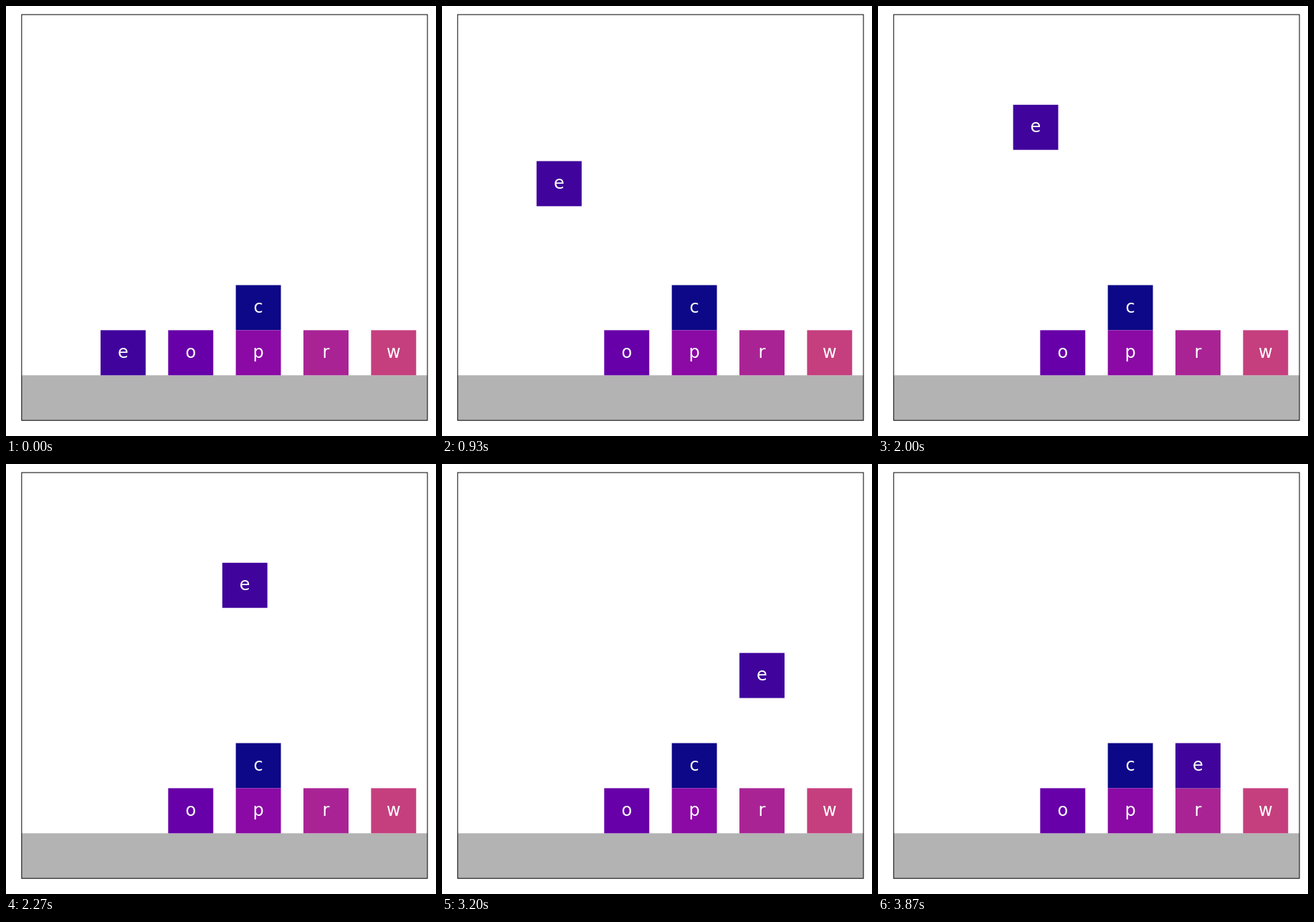
An HTML page for the animation above (3940 ms loop, 600x600 px).

```html
<!DOCTYPE html>
<html lang="en">
<head>
<meta charset="utf-8">
<title>Stacking blocks</title>
<style>
  html, body { margin: 0; width: 100%; height: 100%; overflow: hidden; background: #fff; }
  svg { display: block; width: 100vw; height: 100vh; }
  text { font: 24px "DejaVu Sans", sans-serif; fill: #fff; text-anchor: middle; }
</style>
</head>
<body>
<svg id="stage" viewBox="0 0 600 600"></svg>
<script>
const stage = document.getElementById("stage");
const LOOP = 3940, LAST = 58;
const UNIT = 62.91, LEFT = 21.85, TOP = 12, SIZE = 9 * UNIT;

function add(parent, tag, attrs, label) {
  const el = document.createElementNS("http://www.w3.org/2000/svg", tag);
  for (const name in attrs) el.setAttribute(name, attrs[name]);
  if (label) el.textContent = label;
  return parent.appendChild(el);
}

// Columns and levels are in block units; level 0 rests on the table.
function place(block, col, level) {
  const x = LEFT + col * UNIT;
  const y = TOP + (7 - level) * UNIT;
  block.setAttribute("transform", `translate(${x.toFixed(2)} ${y.toFixed(2)})`);
}

function addBlock(label, fill, col, level) {
  const block = add(stage, "g", {});
  add(block, "rect", { width: UNIT, height: UNIT, fill });
  add(block, "text", { x: UNIT / 2, y: UNIT / 2 + 7.2 }, label);
  place(block, col, level);
  return block;
}

add(stage, "rect", { x: LEFT, y: TOP + 8 * UNIT, width: SIZE, height: UNIT, fill: "#b3b3b3" });
addBlock("c", "#0d0887", 4.75, 1);
addBlock("o", "#6700a8", 3.25, 0);
addBlock("p", "#8b0aa5", 4.75, 0);
addBlock("r", "#a92395", 6.25, 0);
addBlock("w", "#c53f7e", 7.75, 0);
const mover = addBlock("e", "#40039c", 1.75, 0);
add(stage, "rect", { x: LEFT, y: TOP, width: SIZE, height: SIZE, fill: "none", stroke: "#000" });

const clamp = v => Math.max(0, Math.min(1, v));

// Fifteen steps per second, each starting on a 10 ms tick.
function stepAt(t) {
  return Math.min(LAST, Math.floor((Math.floor(t / 10) + 0.4) * 0.15));
}

function draw(t) {
  const k = stepAt(t % LOOP);
  const lift = k < 1 ? 0 : clamp((k + 1) / 20);
  const slide = k < 30 ? 0 : clamp((k - 28) / 10);
  const drop = clamp((k - 38) / 20);
  place(mover, 1.75 + 4.5 * slide, 5 * lift - 4 * drop);
}

let start;
function tick(now) {
  if (start === undefined) start = now;
  draw(now - start);
  requestAnimationFrame(tick);
}
draw(0);
requestAnimationFrame(tick);
</script>
</body>
</html>
```
